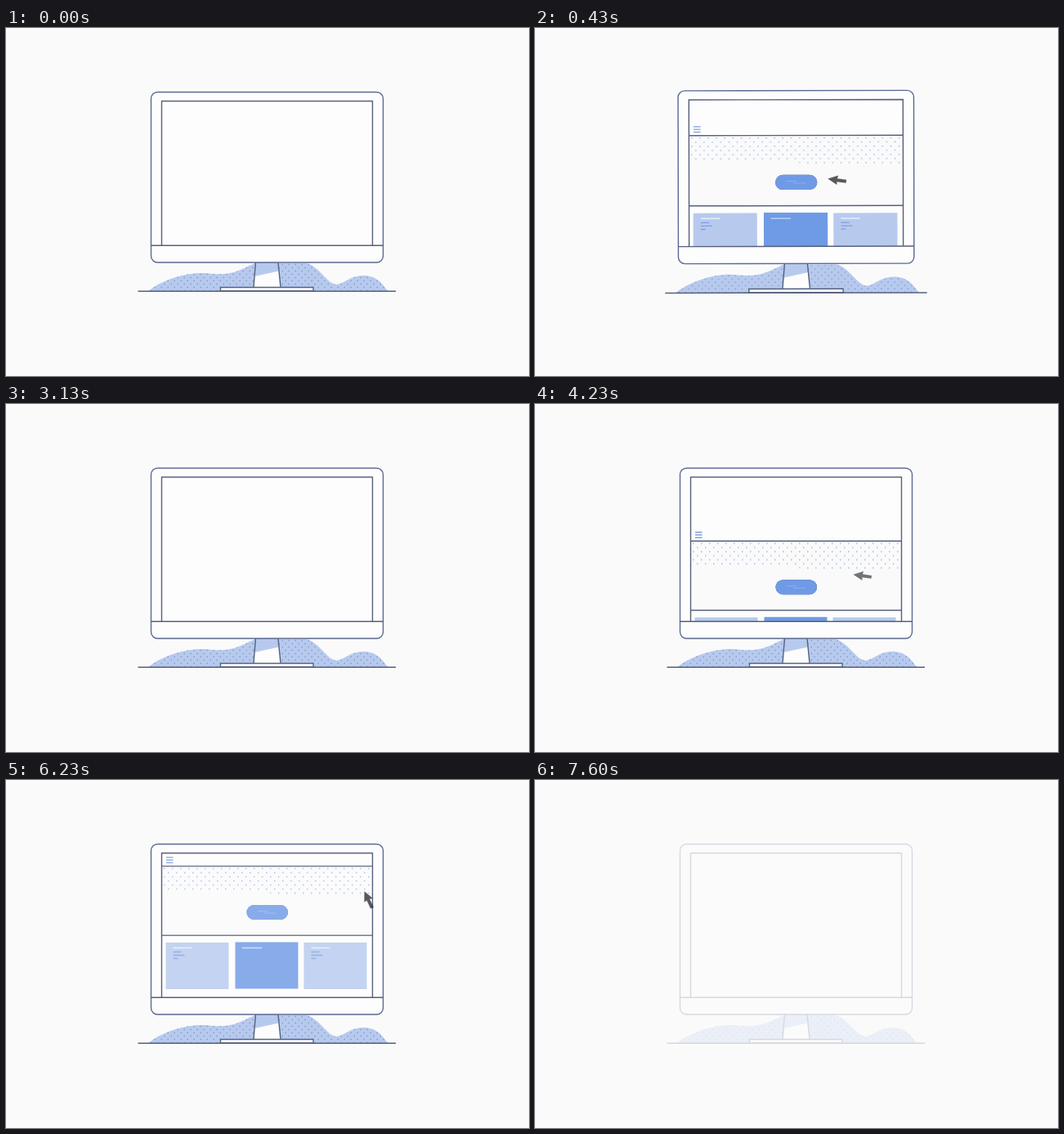
Animation of 640 by 426 pixels, one loop 7.63 s. Source, as an HTML page:

```html
<!DOCTYPE html>
<html lang="en">
<head>
<meta charset="utf-8">
<title>Monitor</title>
<style>
  html, body { margin: 0; height: 100%; overflow: hidden; background: #fafafa; }
  svg { display: block; width: 100vw; height: 100vh; }
  .line { stroke: #56607c; stroke-width: 1.4; }
  .edge { stroke: #5a6a94; stroke-width: 1.4; }
  .mid { fill: #6f9ae6; }
  .pale { fill: #b7caee; }
</style>
</head>
<body>
<svg viewBox="0 0 640 426" fill="none">
  <defs>
    <pattern id="hillDots" width="8" height="8" patternUnits="userSpaceOnUse">
      <path d="M1.5 1.5h1.4M5.5 5.5h1.4" stroke="#7d97d0" stroke-width="1.4"/>
    </pattern>
    <pattern id="heroDots" x="191" y="106" width="10" height="10" patternUnits="userSpaceOnUse">
      <path d="M2 2.5h1.5M7 7.5h1.5" stroke="#9db6ea" stroke-width="1.5"/>
    </pattern>
    <clipPath id="screen"><path d="M190.5 89.500h258V266h-258z"/></clipPath>
    <path id="hills" d="M174 322C192 308 220 299 243 300C272 303 278 301 304 288H368C385 293 393 314 405 314C415 312 422 303 437 303C453 303 460 312 467 322Z"/>
    <g id="card">
      <path class="pale" d="M0 0h77v57H0z"/>
      <path d="M9 6.500h23" stroke="#e6edfb" stroke-width="1.4"/>
      <path d="M9 11.500h10M9 15.500h14M9 19.500h6" stroke="#7e9fe0" stroke-width="1.3"/>
    </g>
  </defs>

  <g id="monitor">
    <use href="#hills" class="pale"/>
    <use href="#hills" fill="url(#hillDots)"/>
    <path d="M305.500 287H333L336 317H303Z" fill="#fdfdfd"/>
    <path class="pale" d="M305.500 287H333L334 297.500L304.200 304Z"/>
    <path class="line" d="M305.500 287L303 317M333 287L336 317"/>
    <path class="line" d="M262.500 317.500H376V322H262.500Z" fill="#fdfdfd"/>
    <path class="line" d="M161.500 322.300H477"/>
    <rect class="edge" x="177.500" y="78.500" width="284" height="208.500" rx="8" fill="#fdfdfd"/>

    <g clip-path="url(#screen)">
      <g id="page">
        <path fill="#fafafa" d="M190 106h259v84h-259z"/>
        <path fill="url(#heroDots)" d="M191 106H448V140H330L300 135H191Z"/>
        <path d="M196 94.800h8.500M196 98h8.500M196 101.200h8.500" stroke="#7e9fe0" stroke-width="1.4"/>
        <path class="line" d="M190 105.500H449M190 190.200H449"/>
        <rect x="294.500" y="153" width="50.500" height="18" rx="9" fill="#3d4f7c"/>
        <rect id="button" class="mid" x="294.500" y="153" width="50.500" height="18" rx="9"/>
        <path id="label" d="M308 160.500h12M316 163h15" stroke="#8db0ee"/>
        <use href="#card" x="195.500" y="199"/>
        <use href="#card" x="364.500" y="199"/>
        <path class="mid" d="M280.500 198.500h77v57h-77z"/>
        <path d="M289 205.500h24" stroke="#c9daf8" stroke-width="1.4"/>
      </g>
    </g>

    <path class="line" d="M190.500 266V89.500H448.500V266"/>
    <path class="line" d="M178 266.300H461"/>
    <path id="cursor" fill="#0b0b10" d="M0 0L5.700 12L2 11.300V22.500H-2V11.300L-5.700 12Z"/>
  </g>
</svg>
<script>
  const [monitor, page, button, label, cursor] =
    ['monitor', 'page', 'button', 'label', 'cursor'].map(id => document.getElementById(id));
  const LOOP = 7630, SECOND_VISIT = 3870;
  const span = (t, from, to) => Math.min(1, Math.max(0, (t - from) / (to - from)));
  const ease = p => p < .5 ? 4 * p ** 3 : 1 - 4 * (1 - p) ** 3;
  const mix = (a, b, p) => a + (b - a) * p;

  function drawMonitor(t) {
    // The still picture shows briefly before the pop-in.
    const p = t < 30 ? 1 : span(t, 30, 467), q = p - 1;
    const scale = 1 + 3.6 * q ** 3 + 2.6 * q ** 2;
    const turn = -18 * q ** 2 * Math.cos(2 * Math.PI * p);
    monitor.setAttribute('transform',
      `translate(320 200) rotate(${turn}) scale(${Math.max(0, scale)}) translate(-320 -200)`);
    monitor.setAttribute('opacity', 1 - span(t, 6900, 7800));
  }

  function drawVisit(v) {
    const shown = v >= 0 && v < 3130;
    page.setAttribute('opacity', shown ? 1 - span(v, 2200, 3130) : 0);
    page.setAttribute('transform', `translate(0 ${177 * (1 - ease(span(v, 0, 650)))})`);

    const press = Math.sin(Math.PI * span(v, 1230, 1500));
    button.setAttribute('y', 153 + 1.8 * press);
    button.setAttribute('height', 18 - 1.8 * press);
    label.setAttribute('opacity', 1 - press);

    const away = 1 - ease(span(v, 0, 750)), leave = ease(span(v, 1690, 2590));
    const x = mix(318, 447, away + leave), y = 155 + 97 * away - 20 * leave;
    const turn = -25 - 57 * Math.min(1, away / .31);
    cursor.setAttribute('transform', `translate(${x} ${y}) rotate(${turn})`);
    cursor.setAttribute('opacity', shown ? span(v, 0, 640) * (1 - span(v, 2250, 2590)) : 0);
  }

  function frame() {
    const t = performance.now() % LOOP;
    drawMonitor(t);
    drawVisit(t < 30 ? -1 : t < 3500 ? t : t - SECOND_VISIT);
    requestAnimationFrame(frame);
  }
  frame();
</script>
</body>
</html>
```
